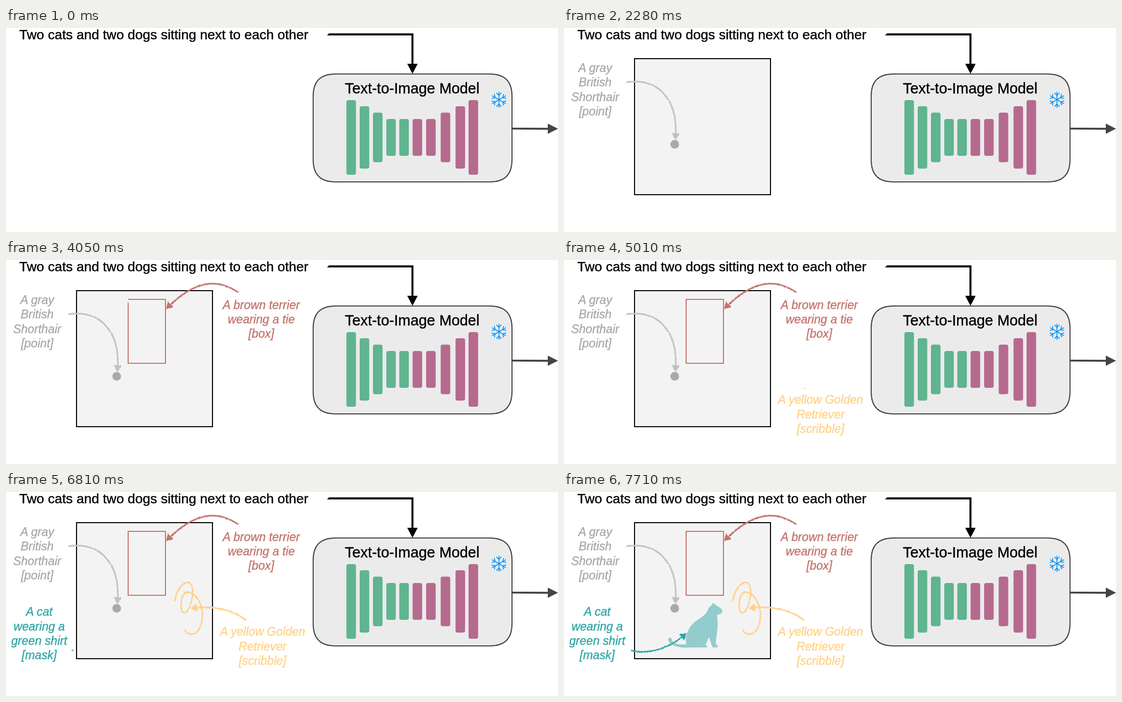
An HTML page for the animation above (8 s loop, 1080 px wide and 399 px high).

```html
<!DOCTYPE html>
<html lang="en">
<head>
<meta charset="utf-8">
<title>Grounded text-to-image</title>
<style>
  html, body { margin: 0; width: 100%; height: 100%; overflow: hidden; background: #fff; }
  svg { display: block; width: 100%; height: 100%; }
  text { font-family: "Liberation Sans", Arial, sans-serif; stroke-width: .4; }
  .title { fill: #000; stroke: #000; }
  .label { font-size: 23.2px; font-style: italic; text-anchor: middle; }
  .ink { fill: none; stroke-width: 3; }
</style>
</head>
<body>
<svg id="stage" viewBox="0 0 1080 399">
  <filter id="chalk" filterUnits="userSpaceOnUse" x="0" y="0" width="1080" height="399" color-interpolation-filters="sRGB">
    <feTurbulence type="fractalNoise" baseFrequency=".35" numOctaves="2" seed="4"/>
    <feDisplacementMap in="SourceGraphic" scale="3" xChannelSelector="R" yChannelSelector="G"/>
  </filter>

  <text class="title" x="26" y="22" font-size="26.5">Two cats and two dogs sitting next to each other</text>
  <path d="M628 14.5 L632 10.5 H797.2 V70 H805.5 L795.3 89.5 L785 70 H793.3 V14.5Z"/>
  <path d="M601 133 C601 104 615 90 644 90 H947 C976 90 990 104 990 133 V258 C990 287 976 301 947 301 H644 C615 301 601 287 601 258Z"
        fill="#ebebeb" stroke="#404040" stroke-width="2"/>
  <path d="M991 195 L1060 195.2 V187 L1080 197 L1060 207 V199 L991 198.5Z" fill="#444"/>
  <text class="title" x="663" y="127.5" font-size="28.9">Text-to-Image Model</text>
  <g id="bars"></g>
  <g id="snow" transform="translate(964.5 140.3)" fill="none" stroke="#0a93f5" stroke-width="1.7" stroke-linecap="round"></g>

  <rect id="canvas" x="138" y="60" width="266" height="266" fill="#f3f3f3" stroke="#000" stroke-width="2"/>
  <circle id="dot" cx="216.6" cy="227.5" r="8.5" fill="#a9a9a9"/>
  <path id="box" class="ink" pathLength="1" d="M239 77 H312 V202 H239Z" stroke="#c4746b" style="stroke-width:2"/>
  <path id="scribble" class="ink" pathLength="1" stroke="#ffd28a" filter="url(#chalk)"
        d="M330 213 C333 195 345 175 357 177 C366 179 367 198 363 212 C360 226 353 238 347 236 C340 233 342 208 348 200 C356 190 372 200 379 216 C387 233 386 262 373 274 C365 281 354 279 350 269"/>
  <path id="cat" fill="#93cccd"
        d="M204 288 C206 283 211 285 211 289 C213 296 223 299 239 298 C237 280 243 265 256 254 C268 245 278 241 282 229 C284 223 290 224 291 217 C295 219 297 221 300 223 C306 226 310 230 310 234 C308 239 303 239 300 240 C299 247 302 257 300 268 C299 280 297 291 297 297 C301 299 302 304 300 304 H291 C288 300 287 290 283 284 C281 290 279 296 276 299 C281 300 282 304 278 304 H247 C225 306 205 300 204 288Z"/>
</svg>
<script>
const LOOP = 8000, STEP = 30, HEAD = 13;
const stage = document.getElementById('stage');
const byId = id => document.getElementById(id);

function add(tag, attrs, parent = stage) {
  const el = document.createElementNS('http://www.w3.org/2000/svg', tag);
  for (const key in attrs) el.setAttribute(key, attrs[key]);
  return parent.appendChild(el);
}

// Bars: left edges share five mirrored heights around y = 214
const barHeights = [146, 122, 97, 72, 72];
[666, 692, 718, 744, 769.5, 795.5, 822, 850.5, 879.5, 905].forEach((x, i) => {
  const height = barHeights[i < 5 ? i : 9 - i];
  add('rect', { x, y: 214 - height / 2, width: 18.7, height, rx: 4,
    fill: i < 5 ? '#60b490' : '#b66a8e' }, byId('bars'));
});

for (let angle = 0; angle < 360; angle += 60)
  add('path', { d: 'M0 0V-15 M-4.5 -13L0 -8.5L4.5 -13', transform: `rotate(${angle})` }, byId('snow'));

const notes = [
  { start: 1830, color: '#a9a9a9', line: '#c0c0c0', x: 61, y: 86,
    text: ['A gray', 'British', 'Shorthair', '[point]'],
    d: 'M122 106 C185 97 225 140 218 219' },
  { start: 3180, color: '#c4746b', line: '#c4746b', x: 499.5, y: 95.5,
    text: ['A brown terrier', 'wearing a tie', '[box]'],
    d: 'M454 63 C420 40 375 32 313 96' },
  { start: 5010, color: '#ffd28a', line: '#ffd28a', x: 502, y: 281.3,
    text: ['A yellow Golden', 'Retriever', '[scribble]'],
    d: 'M470 251 C440 228 405 223 361 227' },
  { start: 6810, color: '#2fa6a6', line: '#2fa6a6', x: 65, y: 242.2,
    text: ['A cat', 'wearing a', 'green shirt', '[mask]'],
    d: 'M131 310 C165 318 205 308 240 276' }
];

for (const note of notes) {
  note.group = add('g', {});
  note.text.forEach((line, i) => {
    add('text', { class: 'label', x: note.x, y: note.y + i * 28.35,
      fill: note.color, stroke: note.color }, note.group).textContent = line;
  });
  const arrow = add('g', { filter: 'url(#chalk)' }, note.group);
  note.path = add('path', { class: 'ink', d: note.d, stroke: note.line }, arrow);
  note.head = add('path', { fill: note.line }, arrow);
  note.length = note.path.getTotalLength();
}

const clamp = v => Math.max(0, Math.min(1, v));
const ease = v => (1 - Math.cos(Math.PI * clamp(v))) / 2;
const show = (el, on) => { el.style.display = on ? '' : 'none'; };

function drawArrow({ path, head, length }, progress) {
  const reach = length * progress;
  const size = clamp((reach + 3) / (HEAD + 3));
  const tail = Math.max(0, reach - HEAD);
  const tip = path.getPointAtLength(reach);
  const from = path.getPointAtLength(tail);
  const angle = Math.atan2(tip.y - from.y, tip.x - from.x) * 180 / Math.PI;
  path.style.strokeDasharray = `${tail} 9999`;
  show(path, tail > 0);
  head.setAttribute('d', 'M0 0L-13 -8V8Z');
  head.setAttribute('transform', `translate(${tip.x} ${tip.y}) rotate(${angle}) scale(${size})`);
}

function drawOutline(el, progress) {
  show(el, progress > 0);
  el.style.strokeDasharray = progress < 1 ? `${progress} 2` : 'none';
}

function render(now) {
  const t = Math.floor(now % LOOP / STEP) * STEP;
  show(byId('canvas'), t >= 930);
  show(byId('dot'), t >= 2280);
  for (const note of notes) {
    show(note.group, t >= note.start);
    if (t >= note.start) drawArrow(note, ease((t - note.start + STEP) / 480));
  }
  drawOutline(byId('box'), ease((t - 3600) / 490));
  drawOutline(byId('scribble'), ease((t - 5430) / 480));
  byId('cat').style.opacity = clamp((t - 7590) / 120);
}

function tick() {
  render(performance.now());
  requestAnimationFrame(tick);
}
tick();
</script>
</body>
</html>
```
